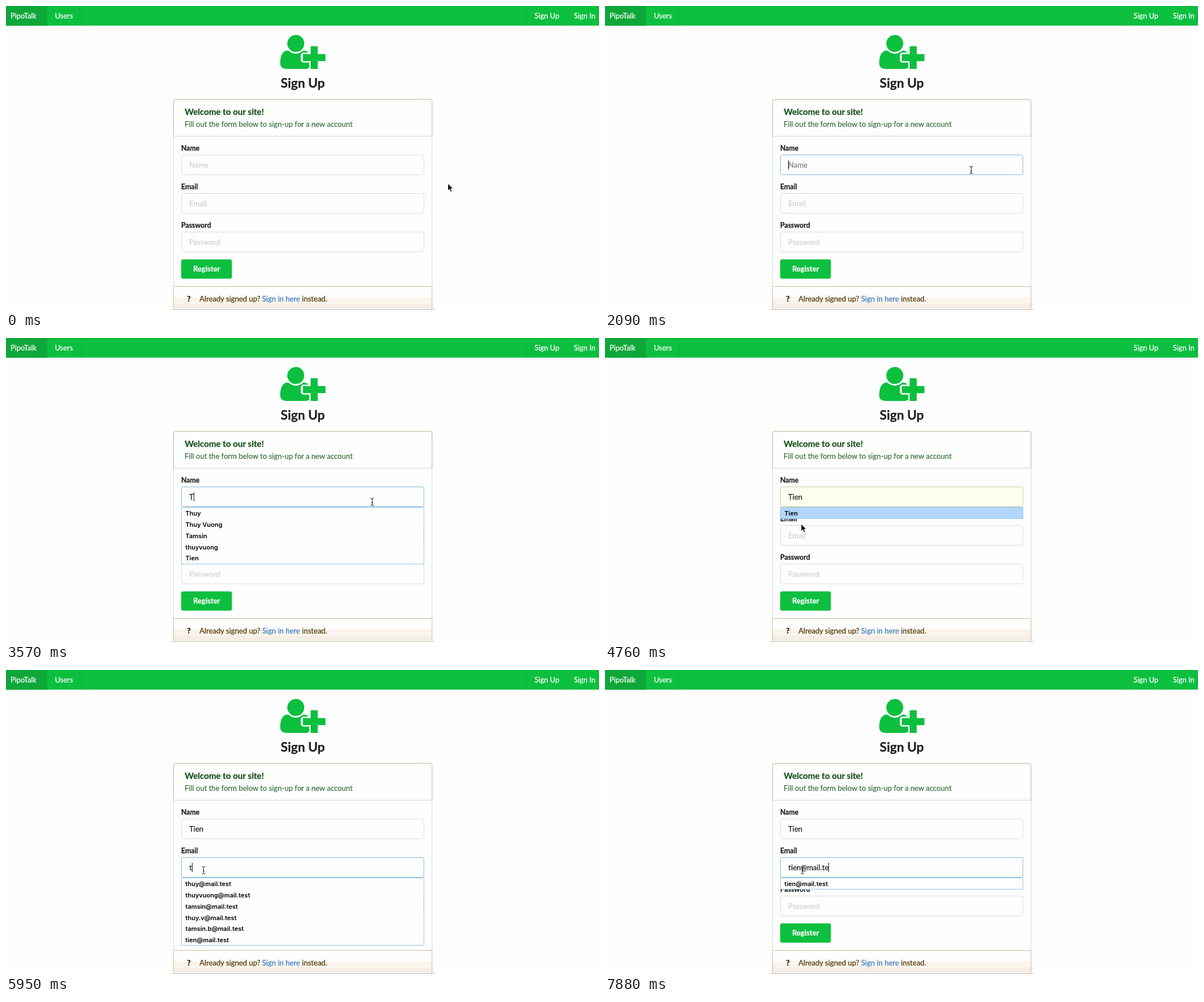
An HTML page for the animation above (8000 ms loop, 1046 by 536 pixels).

```html
<!DOCTYPE html>
<html lang="en">
<head>
<meta charset="utf-8">
<title>Sign Up</title>
<style>
  html, body { margin: 0; width: 100%; height: 100%; overflow: hidden; background: #fefefe; }
  svg { display: block; width: 1046px; height: 536px; font: 13.05px Lato, sans-serif; }
  /* A hairline outline gives the text its slightly heavier weight. */
  text, tspan { fill: currentColor; stroke: currentColor; stroke-width: .25px; }
  .nav { font-size: 12.9px; color: #fff; }
  .label { font-weight: 700; font-size: 12.3px; color: #1f1f20; }
  .box { fill: #fefefe; stroke: #dcdcdd; }
  .value { color: #1f1f20; }
  .empty .value { color: #cfcfcf; }
  .focus .box { stroke: #85b7d9; }
  .focus.empty .value { color: #808080; }
  .preview .box { fill: #feffee; stroke: #b9d2a6; }
  .list rect { fill: #fefefe; stroke: #9cc3e8; }
  .list.picked rect { fill: #b2d6fe; }
  .list text { font: 600 11px Inter, sans-serif; color: #000; stroke: none; }
</style>
</head>
<body>
<svg viewBox="0 0 1046 536">
  <rect width="1046" height="34.6" fill="#0dbf3f"/>
  <rect width="73" height="34.6" fill="#10a73a"/>
  <path d="M72.5 0V34.6M131.5 0V34.6M919.5 0V34.6M988.5 0V34.6" stroke="#0cb23a"/>
  <g class="nav">
    <text x="8" y="21.5">PipoTalk</text>
    <text x="86.2" y="21.5">Users</text>
    <text x="932.3" y="21.5">Sign Up</text>
    <text x="1001.8" y="21.5">Sign In</text>
  </g>

  <g fill="#0dbf3f" transform="translate(483.7 106) scale(.039 -.039)">
    <circle cx="704" cy="1024" r="384"/>
    <path d="M928 288q0-52 38-90t90-38h256v-238q-68-50-171-50H267q-121 0-194 69T0 131q0 53 3.5 103.5t14 109T44 452t43 97.5t62 81t85.5 53.5t111.5 20q19 0 39-17q79-61 154.5-91.5T704 565t164.5 30.5T1023 687q20 17 39 17q132 0 217-96h-223q-52 0-90-38t-38-90z"/>
    <rect x="1376" y="-128" width="320" height="1024" rx="24"/>
    <rect x="1024" y="224" width="1024" height="320" rx="24"/>
  </g>
  <text x="523.5" y="144.3" text-anchor="middle" font-size="22.7" font-weight="700" color="#1f1f20">Sign Up</text>

  <path d="M295.5 229V494M751.5 229V494" stroke="#d8d8d9"/>
  <path d="M295.5 229.5V168q0-3.5 3.5-3.5H748q3.5 0 3.5 3.5V229.5" fill="none" stroke="#a3c293"/>
  <path d="M295 229.5H752" stroke="#ccd5c9"/>
  <text x="315.2" y="191.7" font-size="15.15" font-weight="700" color="#1a531b">Welcome to our site!</text>
  <text x="315" y="212.5" color="#3c7340">Fill out the form below to sign-up for a new account</text>

  <g id="form"></g>
  <rect x="309" y="446.7" width="89.5" height="34" rx="3.5" fill="#0dbf3f"/>
  <text x="353.9" y="468" text-anchor="middle" font-weight="700" color="#fff">Register</text>

  <rect x="296" y="514" width="455" height="12" fill="#f9f4ec"/>
  <rect x="296" y="526" width="455" height="10" fill="#f4eee6"/>
  <path d="M295.5 536V494.5H751.5V536" fill="none" stroke="#cabd98"/>
  <path d="M291 535.5H757" stroke="#c9c7c4"/>
  <text x="319.5" y="521" font-weight="900" color="#3f2a06">?</text>
  <text x="341.3" y="521" color="#573a08">Already signed up? <tspan color="#3b80c6">Sign in here</tspan> instead.</text>

  <g id="list" class="list"></g>
  <path id="caret" stroke="#111" d="M0 0v16"/>
  <path id="arrow" d="M0 0V12.5L2.9 9.9L4.9 14.6L7 13.7L5 9.1H8.9Z" fill="#000" stroke="#fff" stroke-width=".8"/>
  <path id="beam" d="M-3-6.5Q0-6.5 0-4.5Q0-6.5 3-6.5M-3 6.5Q0 6.5 0 4.5Q0 6.5 3 6.5M0-5V5M-1.5 1.5H1.5" fill="none" stroke="#222"/>
</svg>
<script>
const LOOP = 8000, ROW = 19.85;
const $ = id => document.getElementById(id);
const fieldTop = { Name: 262, Email: 330, Password: 398 };
const names = ["Thuy", "Thuy Vuong", "Tamsin", "thuyvuong", "Tien"];
const emails = ["thuy", "thuyvuong", "tamsin", "thuy.v", "tamsin.b", "tien"].map(n => n + "@mail.test");
const [lastName, lastEmail] = [names.slice(-1), emails.slice(-1)];

// Each step changes only the listed parts of the state.
const steps = [[0, {
  focus: "", Name: "", Email: "", Password: "", list: [],
  picked: false, caret: false, pointer: "arrow", x: 779.5, y: 313
}]];
const at = (time, change) => steps.push([time, change]);
const move = (time, x, y, pointer, more) => at(time, { x, y, pointer, ...more });

move(140, 794, 311, "arrow");
move(290, 807, 308, "arrow");
move(440, 797, 302, "arrow");
move(600, 763, 292, "arrow");
move(750, 705, 289, "beam");
move(900, 660, 289, "beam");
move(1050, 646, 289, "beam");
at(1200, { focus: "Name", caret: true });
at(1650, { caret: false });
at(2090, { caret: true });
at(2540, { Name: "t" });
at(2680, { list: names });
at(3280, { Name: "", list: [] });
at(3420, { Name: "T" });
at(3570, { list: names });
at(3870, { Name: "Ti", list: lastName });
at(4020, { Name: "Tie" });
at(4170, { Name: "Tien" });
move(4470, 560, 290, "beam");
move(4610, 390, 306, "arrow", { picked: true, caret: false });
move(4760, 346, 328, "arrow");
move(4910, 348, 346, "beam");
move(5050, 348.5, 353, "beam", { picked: false, list: [] });
at(5200, { focus: "Email", caret: true });
at(5800, { Email: "t" });
at(5950, { list: emails });
at(6100, { Email: "ti", list: lastEmail });
[6390, 6540, 6690, 6990, 7140, 7290, 7440, 7580, 7730, 7880].forEach((time, i) =>
  at(time, { Email: lastEmail[0].slice(0, i + 3) }));

$("form").innerHTML = Object.entries(fieldTop).map(([name, top]) => `
  <text class="label" x="309" y="${top - 6.7}">${name}</text>
  <g id="${name}">
    <rect class="box" x="309.5" y="${top + .5}" width="427.6" height="35" rx="3.5"/>
    <text class="value" x="323.2" y="${top + 23.2}"></text>
  </g>`).join("");

function place(id, x, y, visible) {
  $(id).setAttribute("transform", `translate(${x} ${y})`);
  $(id).style.display = visible ? "" : "none";
}

function draw(state) {
  for (const name in fieldTop) {
    const field = $(name), focused = state.focus === name;
    field.classList.toggle("empty", !state[name]);
    field.classList.toggle("focus", focused);
    field.classList.toggle("preview", focused && state.picked);
    field.querySelector("text").textContent = state[name] || name;
  }

  const { focus, list } = state, top = fieldTop[focus] || 0;
  $("list").classList.toggle("picked", state.picked);
  $("list").innerHTML = list.length ? `
    <rect x="309.5" y="${top + 36.5}" width="427.6" height="${Math.round(list.length * ROW + .3)}"/>` +
    list.map((item, i) => `<text x="316.5" y="${top + 51 + i * ROW}">${item}</text>`).join("") : "";

  const typed = state[focus] ? $(focus).querySelector("text").getComputedTextLength() : 0;
  place("caret", Math.round(323 + typed) + .5, top + 10, state.caret);
  for (const id of ["arrow", "beam"]) place(id, state.x, state.y, state.pointer === id);
}

let shown = -1;
function tick() {
  const time = performance.now() % LOOP;
  const count = steps.filter(([start]) => start <= time).length;
  if (count !== shown) {
    draw(Object.assign({}, ...steps.slice(0, count).map(step => step[1])));
    shown = count;
  }
  requestAnimationFrame(tick);
}
tick();
</script>
</body>
</html>
```
